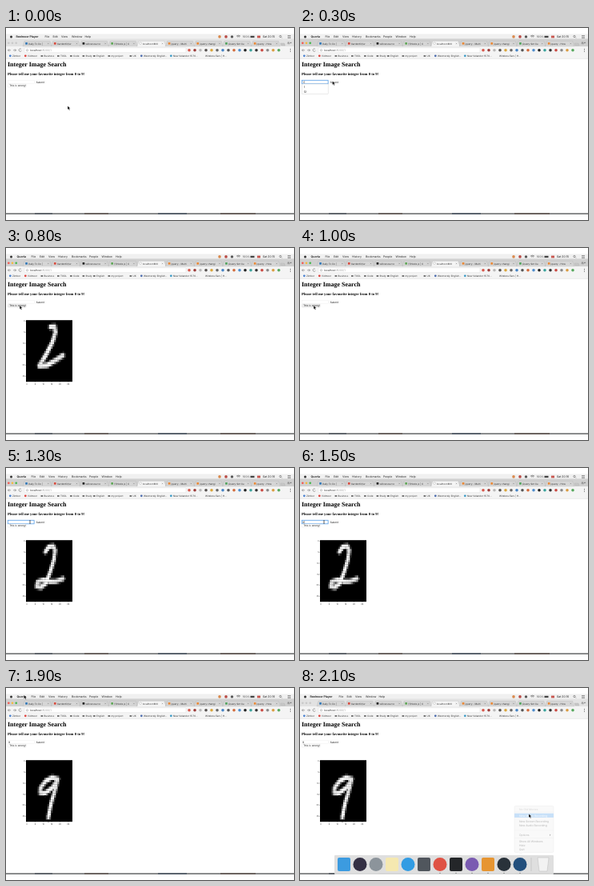
Write an HTML page that moves like this. It is 360 px wide and 240 px high and loops after 2200 ms.

```html
<!DOCTYPE html>
<html lang="en">
<head>
<meta charset="utf-8">
<title>Integer Image Search</title>
<style>
html, body { margin: 0; width: 100%; height: 100%; overflow: hidden; background: #fff; }
svg { display: block; width: 100vw; height: 100vh; font-family: Inter, Roboto, "Noto Sans CJK SC", sans-serif; text-rendering: geometricPrecision; }
.serif { font-family: "Liberation Serif", "Noto Serif", serif; font-weight: bold; }
</style>
</head>
<body>
<svg id="stage" viewBox="0 0 360 240"></svg>
<script>
const NS = "http://www.w3.org/2000/svg";
const stage = document.getElementById("stage");
const LOOP = 2200, STEP = 100;

function add(parent, tag, attrs) {
  const el = document.createElementNS(NS, tag);
  for (const key in attrs) el.setAttribute(key, attrs[key]);
  return parent.appendChild(el);
}
const group = (parent = stage) => add(parent, "g", {});
const rect = (p, x, y, width, height, fill, more) => add(p, "rect", { x, y, width, height, fill, ...more });
const circle = (p, cx, cy, r, fill, more) => add(p, "circle", { cx, cy, r, fill, ...more });
const path = (p, d, stroke, width = 0.5, fill = "none") =>
  add(p, "path", { d, stroke, "stroke-width": width, fill });
function label(p, text, x, y, size = 3, fill = "#333", more) {
  const el = add(p, "text", { x, y, "font-size": size, fill, ...more });
  el.textContent = text;
  return el;
}
const show = (el, on) => el.setAttribute("display", on ? "inline" : "none");

// Desktop edge and page
rect(stage, 0, 7.5, 360, 225, "#fff");
rect(stage, 0, 231.6, 360, 1, "#17191d");
[[36, 22, "#343c48"], [98, 30, "#4b3a30"], [190, 36, "#26384a"], [268, 44, "#49372d"]]
  .forEach(([x, w, color]) => rect(stage, x, 231.6, w, 1, color));

// Menu bar
rect(stage, 0, 7.5, 360, 5.8, "#f0f0f0");
circle(stage, 6.5, 10.9, 1.5, "#333");
function menuBar(items) {
  const g = group();
  items.forEach(([text, x], i) =>
    label(g, text, x, 12.2, 3.5, "#222", { "font-weight": i ? 400 : 700 }));
  return g;
}
const playerMenu = menuBar([["Reelmoor Player", 12.5], ["File", 48.5], ["Edit", 58.5], ["View", 69], ["Window", 82], ["Help", 98.5]]);
const browserMenu = menuBar([["Quorla", 13.5], ["File", 31.5], ["Edit", 42], ["View", 53], ["History", 65], ["Bookmarks", 82], ["People", 104], ["Window", 119.5], ["Help", 137]]);
circle(stage, 267, 10.9, 1.8, "#d98a4d");
circle(stage, 275, 10.9, 1.8, "#b94a45");
circle(stage, 282.5, 10.9, 1.7, "#555");
path(stage, "M288 10.2q2.5-2 5 0M289 11.2q1.5-1.2 3 0", "#444", 0.6);
label(stage, "100%", 296, 12.1, 3.3);
rect(stage, 305.5, 9.8, 5, 2.3, "#444");
rect(stage, 314, 9.6, 4, 2.8, "#c95750");
const clock = label(stage, "", 321, 12.2, 3.5, "#222");
circle(stage, 343, 10.5, 1.2, "none", { stroke: "#444", "stroke-width": 0.5 });
path(stage, "M344 11.5l1 1M352 9.5h4M352 11h4M352 12.5h4", "#444");

// Tab strip
const tabStrip = rect(stage, 0, 13.3, 360, 10, "#d0d0d0");
const lights = ["#f35b54", "#f4b93f", "#45b94f"].map((color, i) => [circle(stage, 3.3 + i * 4.7, 18.8, 1.35, color), color]);
const tabs = [
  ["Daily To Do |", "#3479b7"], ["GardenKit/w", "#d84e41"], ["willowsource", "#222"],
  ["(1)Node.js | C", "#63a85b"], ["localhost:800", "#fff"], ["jquery - Multi", "#e98938"],
  ["jquery changi", "#e98938"], ["jQuery Set Cu", "#51a35d"], ["jquery - How", "#e98938"]
];
tabs.forEach(([text, color], i) => {
  const x = 21 + i * 35.7, active = i === 4;
  path(stage, `M${x} 23.3l2-7h32l2 7z`, "#aaa", 0.3, active ? "#f5f5f5" : "#d6d6d6");
  rect(stage, x + 3.2, 18, 2.7, 2.7, color, active ? { stroke: "#888", "stroke-width": 0.3 } : {});
  label(stage, text, x + 7, 20.7, 3, "#333");
  path(stage, `M${x + 31} 18.7l1.6 1.6m0-1.6l-1.6 1.6`, "#666", 0.35);
});
path(stage, "M344 22l-1-3h5l1 3z", "#aaa", 0.3, "#c6c6c6");
label(stage, "用户", 351.5, 20.2, 3, "#444");

// Address bar
rect(stage, 0, 23.3, 360, 15.2, "#f4f4f4");
path(stage, "M6 27.8H2.5l1.5-1.5m-1.5 1.5l1.5 1.5M9 27.8h3.5l-1.5-1.5m1.5 1.5l-1.5 1.5M19 26.5a1.7 1.7 0 1 0 .3 1.8", "#666", 0.55);
rect(stage, 23, 24.7, 202, 6, "#fff", { rx: 0.7, stroke: "#ccc", "stroke-width": 0.3 });
circle(stage, 26.5, 27.8, 1.1, "none", { stroke: "#666", "stroke-width": 0.4 });
const address = label(stage, "", 30, 29, 3.4, "#333");
address.innerHTML = 'localhost<tspan fill="#999">:8000/1</tspan>';
["#d7574b", "#9b3b39", "#b8b8b8", "#55504e", "#d9a53c", "#666", "#4584c5", "#555", "#d26a3b",
 "#4f8dcc", "#222", "#3aa29c", "#333", "#c94740", "#888", "#d99b40", "#55a75c"]
  .forEach((color, i) => circle(stage, 229 + i * 7, 27.8, 1.8, color));
path(stage, "M355.5 25.8v.8m0 .8v.8m0 .8v.8", "#555", 0.9);

// Bookmarks
[["Zimbor", 8, "#4b82d0"], ["Vidmoor", 27, "#df423d"], ["Business", 47.5], ["TODL", 68], ["Code", 84],
 ["Study", 99.5], ["English", 113], ["my project", 131.5], ["UK", 158.5],
 ["Wexmorely English...", 172, "#4d6cae"], ["New Velandor 15 70...", 209, "#3d9bc6"], ["Wireless Ears | H...", 249]]
  .forEach(([text, x, color], i) => {
    if (i < 11) color
      ? circle(stage, x - 2.7, 34.8, 1.4, color)
      : rect(stage, x - 4, 33.9, 2.7, 2, "#777", { rx: 0.3 });
    label(stage, text, x, 35.9, 3, "#333");
  });
path(stage, "M0 38.4H360", "#ccc", 0.3);

// Search form
label(stage, "Integer Image Search", 2, 47.5, 8, "#000", { class: "serif" });
label(stage, "Please tell me your favourite integer from 0 to 9!", 2, 59.2, 4.68, "#000", { class: "serif" });
const field = rect(stage, 2.3, 65.3, 32.8, 4.5, "#fff");
const typed = label(stage, "", 3.3, 68.8, 3.2, "#111");
const caret = rect(stage, 5.7, 66, 0.3, 3.1, "#222");
rect(stage, 36.5, 65.2, 12, 4.6, "#fff", { rx: 0.8, stroke: "#ddd", "stroke-width": 0.2 });
label(stage, "Submit", 37.8, 68.6, 3.1, "#111");
const wrong = rect(stage, 2.3, 70, 23, 4.2, "#fff", { rx: 0.8, stroke: "#ccc", "stroke-width": 0.25 });
label(stage, "This is wrong!", 4.3, 73.2, 3.1, "#111");
const suggestions = group();
rect(suggestions, 2.3, 70, 32.8, 12.3, "#fff", { stroke: "#bbb", "stroke-width": 0.3 });
label(suggestions, "1", 4.7, 74.5, 3.4, "#111");
label(suggestions, "12", 4.7, 80.5, 3.4, "#111");

// Digit plot: each cell is shaded by its distance from a pen stroke
const CELL_W = 58 / 28, CELL_H = 77 / 28;
const plot = group();
rect(plot, 25, 90.2, 58, 77, "#000");
for (let n = 0; n <= 25; n += 5) {
  const x = 25 + (n + 0.5) * CELL_W, y = 90.2 + (n + 0.5) * CELL_H;
  path(plot, `M24.2 ${y}h.8M${x} 167.2v.8`, "#333", 0.3);
  label(plot, n, 23.7, y + 0.9, 2.5, "#333", { "text-anchor": "end" });
  label(plot, n, x, 171, 2.5, "#333", { "text-anchor": "middle" });
}
function segmentDistance(x, y, [ax, ay], [bx, by]) {
  const dx = bx - ax, dy = by - ay;
  const k = Math.max(0, Math.min(1, ((x - ax) * dx + (y - ay) * dy) / (dx * dx + dy * dy)));
  return Math.hypot(x - ax - k * dx, y - ay - k * dy);
}
function digit(points, radius) {
  const g = group(plot);
  for (let row = 0; row < 28; row++) for (let col = 0; col < 28; col++) {
    let d = 99;
    for (let i = 1; i < points.length; i++)
      d = Math.min(d, segmentDistance(col + 0.5, row + 0.5, points[i - 1], points[i]));
    const v = Math.round(255 * Math.max(0, Math.min(1, radius + 0.5 - d)));
    if (v > 8) rect(g, 25 + col * CELL_W, 90.2 + row * CELL_H, CELL_W + 0.08, CELL_H + 0.08, `rgb(${v},${v},${v})`);
  }
  return g;
}
const digits = [
  digit([[14.8, 3.1], [17.2, 2.9], [17.8, 5.5], [16, 10], [12, 15.8], [8, 20.8], [12.8, 20.5], [18, 18.2], [22.2, 16]], 1.15),
  digit([[11.7, 5.3], [13.8, 3], [16.5, 2.7], [17.6, 4.7], [16.8, 9], [14.6, 14.5], [12, 19.5], [9, 21.5], [6.5, 21], [7, 19], [10.5, 18], [14.5, 18.8], [18, 18.8], [22.3, 17.5]], 1.05),
  digit([[19.2, 8.6], [16, 7.8], [12, 9.4], [8.8, 12.5], [8.6, 14.8], [11.5, 15], [16, 12.5], [19, 9], [17.2, 14.5], [15, 20], [13.5, 26]], 1.05)
];

// Dock and its pop-up menu
const dock = group();
rect(dock, 43, 209, 274, 24, "#dedede", { rx: 1, opacity: 0.94 });
[["#3c9be0", 1], ["#343044"], ["#8c949b"], ["#f5e8b0", 1], ["#329ce3"], ["#50565d", 1], ["#df5244"],
 ["#242629", 1], ["#7a5bb1"], ["#e69532", 1], ["#29323a"], ["#234f7c"]]
  .forEach(([color, square], i) => {
    const x = 55 + i * 20;
    if (square) rect(dock, x - 8, 212, 16, 17, color, { rx: 2 });
    else circle(dock, x, 220.5, 8.5, color);
    if (i > 5) circle(dock, x, 231.3, 0.5, "#333");
  });
path(dock, "M289 212v17", "#aaa", 0.4);
path(dock, "M297 212h14l-2 17h-10z", "#bbb", 0.5, "#f2f2f2");

const popup = group();
rect(popup, 268, 147.5, 49, 58, "#f1f1f1", { rx: 1.2, stroke: "#bbb", "stroke-width": 0.3 });
path(popup, "M273 205.5l3 3 3-3z", "none", 0, "#f1f1f1");
rect(popup, 268, 156.7, 49, 5.2, "#75b2ef");
[["No Old Movies", 152.5, "#999"], ["New Movie Recording", 160.5, "#fff"], ["New Screen Recording", 167.5],
 ["New Audio Recording", 172.5], ["Options", 185], ["Show All Windows", 192.5], ["Hide", 197.5], ["Quit", 202.5]]
  .forEach(([text, y, color]) => label(popup, text, 274, y, 3.4, color || "#444"));
path(popup, "M268 155h49M268 178h49M268 187.5h49", "#ccc", 0.3);
path(popup, "M312 182.5l1.5 1.2-1.5 1.2z", "none", 0, "#444");

// Pointers
const arrow = path(stage, "M0 0v4.5l1.1-1 .8 1.8.9-.4-.8-1.8h1.5z", "#fff", 0.3, "#000");
const beam = path(stage, "M-1-2q1 0 1 .7v2.6q0 .7-1 .7M1-2q-1 0-1 .7v2.6q0 .7 1 .7", "#222", 0.4);

// Pointer stops: step, x, y, shape
const stops = [
  [0, 77, 97.5, arrow], [1, 48, 79, arrow], [2, 25, 67.5, beam], [3, 40.5, 66.5, arrow],
  [5, 33, 67.5, beam], [6, 33, 67.5, null], [7, 40.5, 67, arrow], [8, 17, 72, arrow],
  [11, 26, 69, arrow], [13, 30, 67.5, beam], [16, 40.5, 67, arrow], [18, 34, 40, arrow],
  [19, 22.5, 9, arrow], [20, 284, 178, arrow], [21, 286, 157.5, arrow]
];
const between = (n, a, b) => n >= a && n <= b;

function draw(time) {
  const n = Math.floor((time % LOOP) / STEP);
  const playerFront = n === 0 || n === 21;
  show(playerMenu, playerFront);
  show(browserMenu, !playerFront);
  tabStrip.setAttribute("fill", playerFront ? "#e2e2e2" : "#d0d0d0");
  lights.forEach(([light, color]) => light.setAttribute("fill", playerFront ? "#c9c9c9" : color));
  clock.textContent = n < 13 ? "Sat 20:15" : "Sat 20:16";

  const focused = between(n, 2, 3) || between(n, 6, 7) || between(n, 13, 16);
  field.setAttribute("stroke", focused ? "#579ee8" : "#ddd");
  field.setAttribute("stroke-width", focused ? 0.8 : 0.25);
  typed.textContent = n === 3 ? "1" : n >= 15 ? "9" : "";
  show(caret, n === 3 || n === 15);
  show(suggestions, between(n, 2, 3));
  wrong.setAttribute("fill", between(n, 8, 10) ? "#eee" : "#fff");

  const current = between(n, 5, 8) ? 0 : between(n, 11, 16) ? 1 : n >= 18 ? 2 : -1;
  show(plot, current >= 0);
  digits.forEach((g, i) => show(g, i === current));
  show(dock, n >= 20);
  show(popup, n >= 20);
  popup.setAttribute("opacity", n === 21 ? 0.4 : 1);

  const [, x, y, shape] = stops.filter(stop => stop[0] <= n).pop();
  for (const pointer of [arrow, beam]) {
    show(pointer, pointer === shape);
    pointer.setAttribute("transform", `translate(${x} ${y})`);
  }
}

const start = performance.now();
function tick() {
  draw(performance.now() - start);
  requestAnimationFrame(tick);
}
draw(0);
requestAnimationFrame(tick);
</script>
</body>
</html>
```
